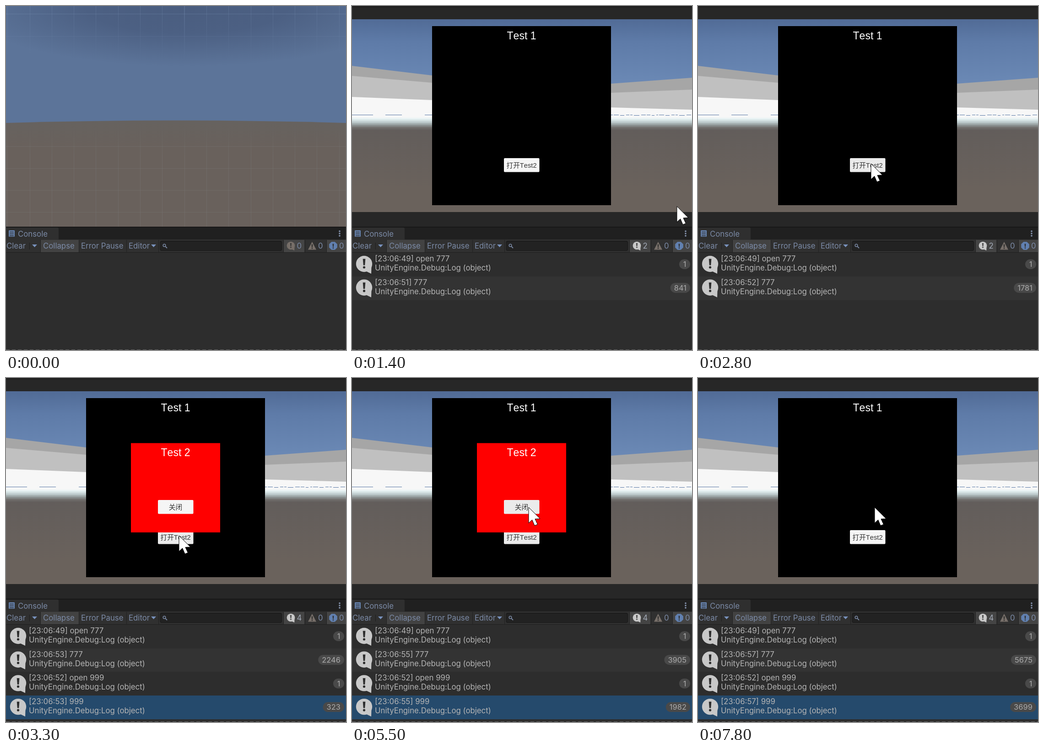
Recreate the animation shown at these times as an HTML page with a canvas. Size 743 by 753 pixels, loop 8 s.

```html
<!DOCTYPE html>
<html lang="en">
<head>
<meta charset="utf-8">
<title>Panel test</title>
<style>
html, body { margin: 0; width: 100%; height: 100%; overflow: hidden; background: #2d2d2d; }
canvas { display: block; }
</style>
</head>
<body>
<canvas id="stage" width="743" height="753"></canvas>
<script>
const W = 743, H = 753, LOOP = 8000;
const SHOW_FIRST = 200, SHOW_SECOND = 2900, HIDE_SECOND = 7800;
const ctx = document.getElementById('stage').getContext('2d');
const UI = '16.8px Inter, sans-serif';
const SANS = '"Liberation Sans", "Noto Sans CJK SC", "Noto Sans CJK", sans-serif';
const BLUE = '#7b8aa6';

// Moments at which the picture refreshes
const TICKS = [0, 200, 300, 500, 700, 900, 1100,
  1300, 1400, 1500, 1600, 1700, 1800, 1900, 2000, 2100, 2300,
  2400, 2500, 2600, 2700, 2900, 3100, 3300,
  3500, 3700, 3900, 4100, 4300, 4400,
  4700, 4800, 4900, 5100, 5300, 5500, 5700,
  5900, 6100, 6300, 6500, 6700, 6800,
  7000, 7200, 7400, 7600, 7700, 7800];

const COUNT = [[200, 2], [2300, 1471], [3300, 2246], [5500, 3905], [7000, 5075], [7800, 5675]];
const CURSOR = [[1300, 760, 452], [1500, 660, 425], [1700, 540, 392], [1900, 440, 364],
  [2100, 388, 348], [2300, 378, 345], [4600, 378, 345], [4800, 381, 322],
  [4900, 384, 296], [5100, 386, 277], [5300, 386, 283]];

function sample(keys, t, i = 1) {
  if (t <= keys[0][0]) return keys[0][i];
  for (let k = 1; k < keys.length; k++) {
    const a = keys[k - 1], b = keys[k];
    if (t <= b[0]) return a[i] + (b[i] - a[i]) * (t - a[0]) / (b[0] - a[0]);
  }
  return keys[keys.length - 1][i];
}

function rect(x, y, w, h, fill, r = 0) {
  ctx.fillStyle = fill;
  ctx.beginPath();
  ctx.roundRect(x, y, w, h, r);
  ctx.fill();
}

function poly(points, fill) {
  ctx.fillStyle = fill;
  ctx.beginPath();
  points.forEach(([x, y]) => ctx.lineTo(x, y));
  ctx.closePath();
  ctx.fill();
}

function disc(x, y, r, fill) {
  ctx.fillStyle = fill;
  ctx.beginPath();
  ctx.arc(x, y, r, 0, 7);
  ctx.fill();
}

function line(x1, y1, x2, y2, color, width = 1) {
  ctx.strokeStyle = color;
  ctx.lineWidth = width;
  ctx.beginPath();
  ctx.moveTo(x1, y1);
  ctx.lineTo(x2, y2);
  ctx.stroke();
}

function text(s, x, y, font, fill, align = 'left') {
  ctx.font = font;
  ctx.fillStyle = fill;
  ctx.textAlign = align;
  ctx.fillText(s, x, y);
}

function vertical(y1, y2, ...stops) {
  const g = ctx.createLinearGradient(0, y1, 0, y2);
  stops.forEach(([at, color]) => g.addColorStop(at, color));
  return g;
}

function drawEmptyScene() {
  rect(0, 0, W, 484, '#5c7499');
  ctx.save();
  ctx.scale(1, 0.27);
  const glow = ctx.createRadialGradient(395, 0, 0, 395, 0, 490);
  glow.addColorStop(0, '#4a5d7f');
  glow.addColorStop(0.45, '#4c6083');
  glow.addColorStop(1, '#5c7499');
  rect(0, 0, W, 490, glow);
  ctx.restore();

  ctx.fillStyle = vertical(250, 310, [0, '#66625f'], [1, '#69615c']);
  ctx.beginPath();
  ctx.moveTo(0, 256);
  ctx.quadraticCurveTo(W / 2, 245, W, 256);
  ctx.lineTo(W, 484);
  ctx.lineTo(0, 484);
  ctx.fill();

  const step = 48.3;
  const sky = vertical(0, 120, [0, 'rgba(130,155,190,.26)'], [1, 'rgba(130,155,190,0)']);
  const ground = vertical(258, 330, [0, 'rgba(125,128,128,0)'], [1, 'rgba(125,128,128,.3)']);
  for (let x = 3.7; x < W; x += step) {
    const px = Math.floor(x);
    rect(px, 0, 1, 120, sky);
    rect(px, 258, 1, 226, ground);
  }
  rect(389, 0, 1, 120, sky);
  rect(0, 17, W, 1, 'rgba(130,155,190,.3)');
  rect(0, 66, W, 1, 'rgba(130,155,190,.13)');
  for (let y = 307; y < 484; y += step) rect(0, Math.floor(y), W, 1, 'rgba(125,128,128,.28)');
}

function drawWorld(hazy) {
  rect(0, 0, W, 484, '#272727');
  rect(0, 0, W, 5, vertical(0, 5, [0, '#1b1b1b'], [1, '#272727']));
  rect(0, 29, W, 422, vertical(29, 170, [0, '#516b96'], [0.35, '#5e7ba8'], [1, '#6b89b5']));

  // Each band: top edge at the left wall's two ends, then the right wall's
  const bands = [
    [131, 152, 170, 157, '#a6a6a6'],
    [153, 168, 190, 183, '#c0c0c0'],
    [199, 206, 222, 227, '#f7f7f7'],
    [251, 247, 248, 251, '#c6c6c6'],
    [258, 253, 253, 257, '#a9a9a9'],
    [263, 259, 259, 263, '#5f7da9'],
    [265, 261, 261, 265, '#625d5b']
  ];
  for (const [a, b, c, d, color] of bands) {
    poly([[0, a], [175, b], [175, 280], [0, 280]], color);
    poly([[566, c], [W, d], [W, 280], [566, 280]], color);
  }
  rect(0, 266, W, 185, vertical(266, 400, [0, '#625d5b'], [1, '#6a625c']));

  if (hazy) {
    rect(0, 243, W, 29, vertical(243, 272, [0, 'rgba(232,245,246,0)'], [0.15, '#e3f0f1'],
      [0.4, '#b9c7c9'], [0.6, '#8f9797'], [0.8, '#706e6c'], [1, '#625d5b']));
    for (let i = 0; i < 5; i++) rect(0, 247 + i * 4, W, 1, `rgba(255,255,255,${0.24 - i * 0.05})`);
  }

  const dash = '#5878a6';
  [[0, 46], [73, 36], [159, 16]].forEach(([x, w]) => rect(x, 238, w, 1, dash));
  for (let x = 566, i = 0; x < W; i++) {
    const w = 4 + (i * 7) % 9;
    rect(x, 238 + (i % 3 === 2 ? 1 : 0), w, 1, dash);
    x += w + 2 + i % 3;
  }
}

function drawButton(y, label, hot) {
  rect(332, y, 77.5, 30.5, hot ? '#ebebeb' : '#f5f5f5', 2);
  text(label, 370.5, y + 21, '14.7px ' + SANS, '#323232', 'center');
}

function drawPanels(t) {
  const second = t >= SHOW_SECOND && t < HIDE_SECOND;
  ctx.fontKerning = 'none';
  rect(175, 44, 391, 392, '#000');
  text('Test 1', 370.5, 73, '23px ' + SANS, '#fff', 'center');
  drawButton(333, '打开Test2', t >= 2100 && t < HIDE_SECOND);
  if (second) {
    rect(273, 142.5, 195, 195.5, '#f00');
    text('Test 2', 370.5, 171, '23px ' + SANS, '#fff', 'center');
    drawButton(267, '关闭', t >= 4900);
  }
  ctx.fontKerning = 'auto';
}

function drawCursor(t) {
  if (t < 1300) return;
  ctx.save();
  ctx.translate(sample(CURSOR, t, 1), sample(CURSOR, t, 2));
  poly([[0, 0], [0, 34.5], [7.6, 27.5], [13, 40], [19.5, 37.5], [14, 25.5], [25, 25]], '#fff');
  ctx.strokeStyle = '#000';
  ctx.lineWidth = 1;
  ctx.stroke();
  ctx.restore();
}

function drawBang(x, y, s, color) {
  poly([[x - 2.8 * s, y - 11 * s], [x + 2.8 * s, y - 11 * s], [x + 1.7 * s, y + 3 * s], [x - 1.7 * s, y + 3 * s]], color);
  disc(x, y + 7.5 * s, 2.6 * s, color);
}

function drawBubble(x, y, s, color, mark) {
  disc(x, y, 17.7 * s, color);
  poly([[x + 4 * s, y + 16 * s], [x + 16 * s, y + 6 * s], [x + 15.5 * s, y + 21.5 * s]], color);
  drawBang(x, y, s, mark);
}

function drawToolbar(logs) {
  rect(0, 483, W, 28, '#202020');
  rect(0, 483, W, 2, '#181818');
  rect(0, 485, 115, 27, '#2f2f2f', [0, 3, 0, 0]);
  rect(6, 491, 13, 14, '#6682ae', 1);
  for (let i = 0; i < 3; i++) {
    rect(8, 494 + i * 4, 9, 1.5, '#2f2f2f');
    disc(729, 493 + i * 5, 1.8, '#8796b1');
  }
  text('Console', 26, 505, UI, BLUE);

  rect(0, 511, W, 29, '#303030');
  rect(76, 512, 83, 27, '#424242');
  rect(607, 512, 45, 27, '#444');
  rect(701, 512, 42, 27, '#444');
  [75, 159, 263, 333, 606, 653, 700].forEach(x => rect(x, 512, 1, 27, '#202020'));
  rect(51, 518, 1, 15, '#1e1e1e');
  rect(0, 539, W, 1, '#1f1f1f');
  text('Clear', 1, 531, UI, BLUE);
  text('Collapse', 81, 531, UI, BLUE);
  text('Error Pause', 164, 531, UI, BLUE);
  text('Editor', 268, 531, UI, BLUE);
  for (const x of [62.5, 322.5]) poly([[x - 5.5, 522], [x + 5.5, 522], [x, 528]], '#7892bd');

  rect(336.5, 514, 266.5, 22, '#181818', 4);
  rect(337.5, 515.5, 264.5, 19.5, '#222', 3.5);
  ctx.strokeStyle = BLUE;
  ctx.lineWidth = 1.5;
  ctx.beginPath();
  ctx.arc(346, 524, 2.8, 0, 7);
  ctx.stroke();
  line(348.2, 526.2, 352, 530, BLUE, 1.8);

  drawBubble(622.5, 524.5, 0.5, logs ? '#c8c8c8' : '#766e68', '#333');
  text(logs, 635.5, 531, UI, logs ? '#a5adba' : BLUE);
  poly([[669, 516], [678, 533.5], [660, 533.5]], '#776f69');
  drawBang(669, 527, 0.48, '#2d2d2d');
  text('0', 682, 531, UI, BLUE);
  poly(Array.from({ length: 8 }, (_, i) => {
    const a = (i + 0.5) * Math.PI / 4;
    return [715 + 9.5 * Math.cos(a), 525 + 9.5 * Math.sin(a)];
  }), '#6180b0');
  drawBang(715, 526, 0.5, '#2d2d2d');
  text('0', 728, 531, UI, BLUE);
}

function drawRow(i, stamp, message, count) {
  const y = 540 + i * 51.7;
  rect(0, Math.round(y), W, 52, i === 3 ? '#254a6c' : i % 2 ? '#333' : '#2d2d2d');
  drawBubble(26.5, y + 24.5, 1, '#c8c8c8', '#2d2d2d');
  text(`[23:06:${stamp}] ${message}`, 50, y + 19, UI, '#b5b5b5');
  text('UnityEngine.Debug:Log (object)', 50, y + 39, UI, '#b5b5b5');
  ctx.font = '16.5px Inter, sans-serif';
  const w = Math.max(24, ctx.measureText(count).width + 16);
  rect(739 - w, y + 14.5, w, 21.5, '#494949', 10.7);
  text(count, 739 - w / 2, y + 31.3, ctx.font, '#ababab', 'center');
}

function drawConsole(t) {
  const first = t >= SHOW_FIRST, second = t >= SHOW_SECOND;
  rect(0, 540, W, H - 540, '#2d2d2d');
  drawToolbar(second ? 4 : first ? 2 : 0);
  const count = Math.round(sample(COUNT, t));
  const stamp = t < 300 ? 49 : 50 + Math.floor((t + 50) / 1000);
  if (first) {
    drawRow(0, 49, 'open 777', 1);
    drawRow(1, stamp, '777', count);
  }
  if (second) {
    drawRow(2, 52, 'open 999', 1);
    drawRow(3, Math.min(stamp, 57), '999', Math.min(count - 1923, 3699));
  }
  ctx.setLineDash([8, 5]);
  line(0, 752.5, W, 752.5, '#666');
  ctx.setLineDash([]);
}

function draw(t) {
  ctx.clearRect(0, 0, W, H);
  if (t < SHOW_FIRST) {
    drawEmptyScene();
  } else {
    drawWorld(t >= 300);
    drawPanels(t);
  }
  drawConsole(t);
  drawCursor(t);
}

const start = performance.now();
function frame() {
  const t = (performance.now() - start) % LOOP;
  draw(TICKS.findLast(tick => tick <= t));
  requestAnimationFrame(frame);
}
frame();
</script>
</body>
</html>
```
